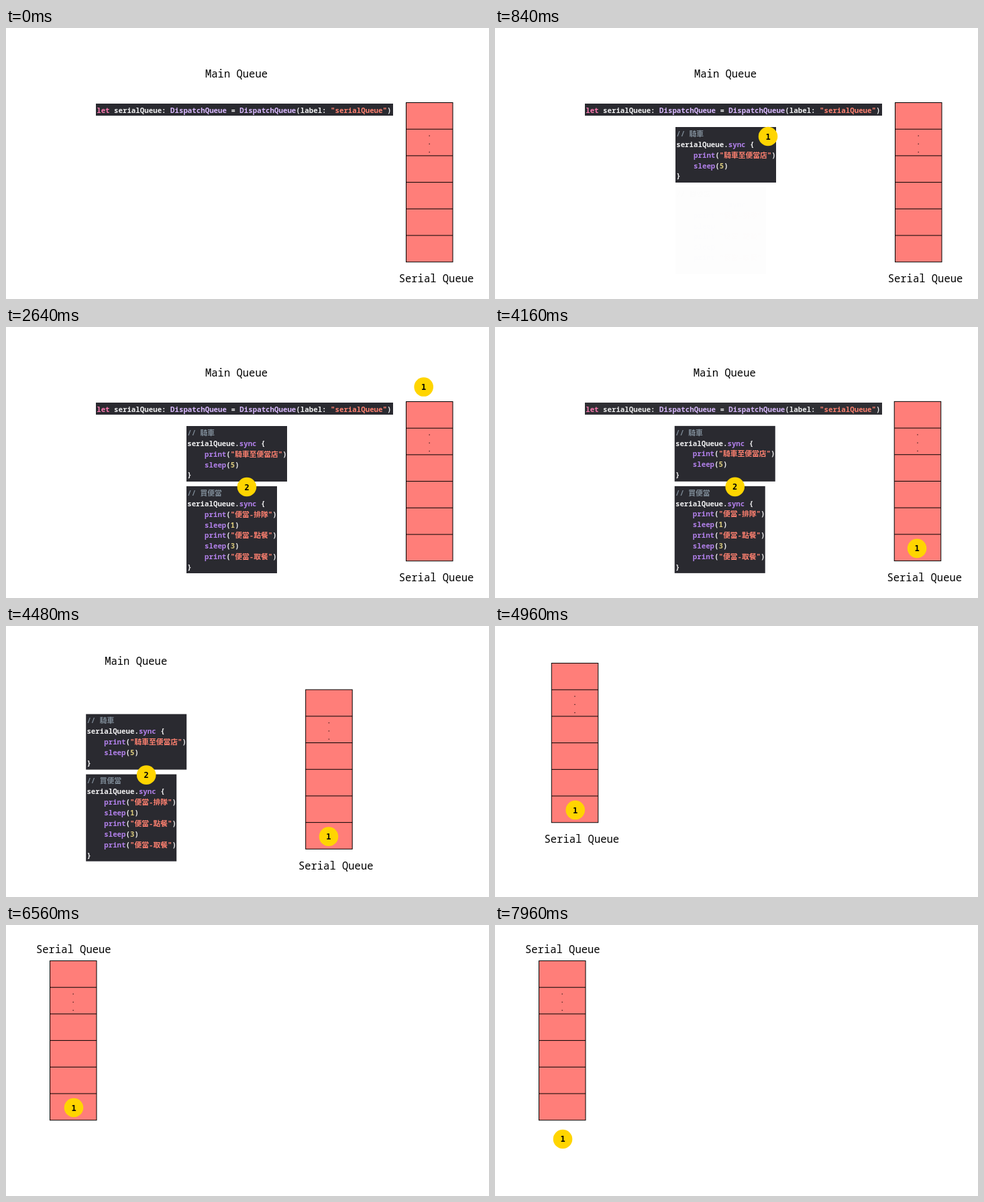
These frames come from a looping animation (720 by 405 pixels, 8 s). An HTML page with a canvas:

```html
<!DOCTYPE html>
<html lang="en">
<head>
<meta charset="utf-8">
<title>Serial queue, sync</title>
<style>
  html, body { margin: 0; width: 100%; height: 100%; overflow: hidden; background: #fff; }
  canvas { display: block; }
</style>
</head>
<body>
<canvas width="720" height="405"></canvas>
<script>
const ctx = document.querySelector('canvas').getContext('2d');
const LOOP = 8000;
const MONO = '"Noto Sans Mono", "Noto Sans CJK TC", "Noto Sans CJK JP", "DejaVu Sans Mono", monospace';
const COLORS = {
  comment: '#7f8c98', string: '#ff8170', keyword: '#ff7ab2',
  type: '#dabaff', call: '#b281eb', number: '#d9c97c', plain: '#f0f0f1'
};
const TOKEN = /(?<comment>\/\/.*)|(?<string>"[^"]*")|(?<keyword>\blet\b)|(?<type>DispatchQueue)|(?<call>\b(?:sync|print|sleep)\b)|(?<number>\d+)|(?<plain>\w+|\s+|.)/g;

const DECLARATION = ['let serialQueue: DispatchQueue = DispatchQueue(label: "serialQueue")'];
const RIDE = [
  '// 騎車', 'serialQueue.sync {', '    print("騎車至便當店")', '    sleep(5)', '}'
];
const LUNCH = [
  '// 買便當', 'serialQueue.sync {', '    print("便當-排隊")', '    sleep(1)',
  '    print("便當-點餐")', '    sleep(3)', '    print("便當-取餐")', '}'
];

// Cubic ease-in-out with control points .42,0 and .58,1.
function ease(u) {
  if (u <= 0) return 0;
  if (u >= 1) return 1;
  let lo = 0, hi = 1;
  for (let i = 0; i < 24; i++) {
    const s = (lo + hi) / 2, r = 1 - s;
    if (1.26 * s * r * r + 1.74 * s * s * r + s * s * s < u) lo = s; else hi = s;
  }
  return lo * lo * (3 - 2 * lo);
}
const step = (t, start, length) => ease((t - start) / length);
const mix = (a, b, p) => a + (b - a) * p;

function text(str, x, y, font, color) {
  ctx.font = font;
  ctx.fillStyle = color;
  ctx.fillText(str, x, y);
}

const label = (str, x, y) => text(str, x, y, `500 15.5px ${MONO}`, '#000');

function code(lines, x, y, w, h, alpha) {
  if (alpha <= 0) return;
  ctx.globalAlpha = alpha;
  ctx.fillStyle = '#2a2a30';
  ctx.fillRect(x, y, w, h);
  const font = `600 10.77px ${MONO}`;
  lines.forEach((line, i) => {
    let left = x + 1.2;
    for (const { 0: part, groups } of line.matchAll(TOKEN)) {
      const kind = Object.keys(groups).find(k => groups[k] !== undefined);
      text(part, left, y + 13.8 + i * 15.9, font, COLORS[kind]);
      left += ctx.measureText(part).width;
    }
  });
  ctx.globalAlpha = 1;
}

function queue(x, y) {
  const w = 69.5, row = 39.7;
  ctx.fillStyle = '#ff7e79';
  ctx.fillRect(x, y, w, row * 6);
  ctx.strokeStyle = '#000';
  ctx.lineWidth = 1;
  ctx.strokeRect(x, y, w, row * 6);
  ctx.beginPath();
  for (let i = 1; i < 6; i++) {
    ctx.moveTo(x, y + i * row);
    ctx.lineTo(x + w, y + i * row);
  }
  ctx.stroke();
  ctx.fillStyle = '#3a1a18';
  for (let i = 0; i < 3; i++) ctx.fillRect(x + 34, y + 49 + i * 12.2, 1.4, 1.2);
}

function badge(n, x, y, alpha = 1) {
  ctx.globalAlpha = alpha;
  ctx.fillStyle = '#ffd500';
  ctx.beginPath();
  ctx.arc(x, y, 14.3, 0, Math.PI * 2);
  ctx.fill();
  ctx.textAlign = 'center';
  text(n, x, y + 4.5, 'bold 12px "DejaVu Sans Mono", monospace', '#000');
  ctx.textAlign = 'left';
  ctx.globalAlpha = 1;
}

function draw(t) {
  const pan = step(t, 4127, 962);
  const lift = step(t, 5567, 962);
  const leave = step(t, 7005, 962);
  const hop = step(t, 2215, 490);
  const drop = step(t, 3175, 490);
  const dx = -531 * pan, dy = -58 * pan;

  ctx.fillStyle = '#fff';
  ctx.fillRect(0, 0, 720, 405);

  label('Main Queue', 297 + dx, 74 + dy);
  code(DECLARATION, 134, 113, 443, 18, 1 - step(t, 4127, 320));
  code(RIDE, 269 + dx, 148 + dy, 150, 83, step(t, 60, 560));
  code(LUNCH, 269 + dx, 238 + dy, 135, 130, step(t, 820, 370));

  queue(596.5 + dx, 111.5 + dy);
  label('Serial Queue', mix(585.7 + dx, 45, lift), mix(380 + dy, 42, lift));

  badge('2', 359 + dx, 239 + dy, step(t, 1215, 500));
  badge('1',
    mix(mix(407, 630.3, hop), 101, pan),
    mix(mix(mix(mix(162, 87, hop), 331, drop), 273, pan), 320, leave),
    step(t, 60, 560));
}

function tick(now) {
  draw(now % LOOP);
  requestAnimationFrame(tick);
}
draw(0);
requestAnimationFrame(tick);
</script>
</body>
</html>
```
